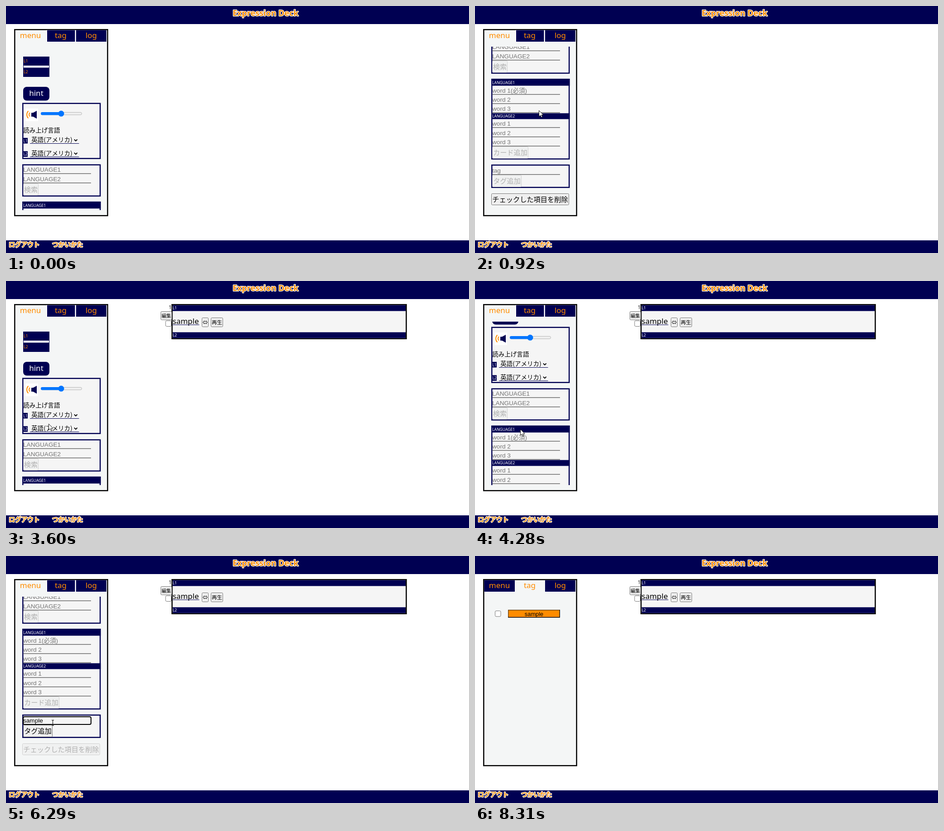
Write an HTML page with a canvas that moves like this. It is 1024x547 px and loops after 8.51 s.

```html
<!DOCTYPE html>
<html lang="ja">
<head>
<meta charset="utf-8">
<title>Expression Deck</title>
<style>
html, body { margin: 0; width: 100%; height: 100%; overflow: hidden; background: #fff; }
canvas { display: block; }
</style>
</head>
<body>
<canvas id="stage" width="1024" height="547"></canvas>
<script>
const ctx = document.getElementById('stage').getContext('2d');
const LOOP = 8510;
const NAVY = '#000052', ORANGE = '#ff8c00', PANEL = '#f4f6f6', BOX = '#f5f5f5';
const GREY = '#757575';
const UI = '"Noto Sans", "Noto Sans CJK JP", sans-serif';
const JP = '"Noto Sans CJK JP", "Noto Sans CJK", sans-serif';
const ARIAL = '"Liberation Sans", "Noto Sans CJK JP", sans-serif';

// Keyframes: [time, ...values]
const SCROLL = [[200, 0], [690, 242], [800, 272], [3599, 272], [3600, 0],
  [4140, 0], [4480, 272], [6999, 272], [7000, 0]];
const POINTER = [[200, 197, 296], [560, 141, 262], [800, 141, 262], [1050, 140, 197],
  [1180, 140, 197], [1520, 155, 190], [2660, 155, 190], [3270, 94, 307], [3400, 94, 314],
  [3600, 94, 316], [3740, 94, 316], [3870, 97, 310], [4140, 97, 310], [4560, 106, 365],
  [6220, 106, 365], [6560, 90, 383], [7200, 90, 383], [7860, 130, 69]];
const CARD_KEYS = [1920, 2050, 2200, 2330, 2530, 2600];
const TAG_KEYS = [5030, 5140, 5250, 5360, 5560, 5760];

function track(keys, t) {
  if (t <= keys[0][0]) return keys[0].slice(1);
  for (let i = 1; i < keys.length; i++) {
    const a = keys[i - 1], b = keys[i];
    if (t < b[0]) {
      const k = (t - a[0]) / (b[0] - a[0]);
      return a.slice(1).map((v, j) => v + (b[j + 1] - v) * k);
    }
  }
  return keys[keys.length - 1].slice(1);
}

const typed = (keys, t) => 'sample'.slice(0, keys.filter(k => t >= k).length);
const between = (t, a, b) => t >= a && t < b;

function rect(x, y, x2, y2, color) {
  ctx.fillStyle = color;
  ctx.fillRect(x, y, x2 - x, y2 - y);
}

function rounded(x, y, x2, y2, r, fill, stroke, width = 1) {
  ctx.beginPath();
  ctx.roundRect(x, y, x2 - x, y2 - y, r);
  if (fill) { ctx.fillStyle = fill; ctx.fill(); }
  if (stroke) { ctx.strokeStyle = stroke; ctx.lineWidth = width; ctx.stroke(); }
}

function text(s, x, y, size, color, family = UI, align = 'left') {
  ctx.font = `${size}px ${family}`;
  ctx.textAlign = align;
  ctx.fillStyle = color;
  ctx.fillText(s, x, y);
}

function outlined(s, x, y, size, align, family) {
  ctx.font = `bold ${size}px ${family}`;
  ctx.textAlign = align;
  ctx.lineJoin = 'round';
  ctx.lineWidth = 2.4;
  ctx.strokeStyle = '#fff';
  ctx.strokeText(s, x, y);
  ctx.fillStyle = ORANGE;
  ctx.fillText(s, x, y);
}

function frame(x, y, x2, y2, color, fill) {
  rect(x, y, x2, y2, color);
  rect(x + 2.5, y + 2.5, x2 - 2.5, y2 - 2.5, fill);
}

function button(s, x, y, x2, y2, size, on = true) {
  rounded(x + .5, y + .5, x2 - .5, y2 - .5, 2, on ? '#efefef' : '#f0f1f1', on ? '#767676' : '#d0d0d0');
  text(s, (x + x2) / 2, (y + y2) / 2 + size * .37, size, on ? '#000' : '#b0b0b0', JP, 'center');
}

function checkbox(x, y) {
  rounded(x + .5, y + .5, x + 13, y + 13, 2.5, '#fff', '#767676');
}

function field(hint, line, value = '', focus = false) {
  if (focus) rounded(38, line - 17, 188, line, 3, BOX, '#000', 2);
  else rect(38, line - .5, 188, line + 1, '#6b6b6b');
  text(value || hint, 38, line - 4, 13.6, value ? '#000' : GREY, ARIAL);
  if (focus && value.length < 2) rect(38 + value.length * 7, line - 15, 39 + value.length * 7, line - 2, '#000');
}

function chip(s, y) {
  rect(38, y, 48, y + 12.5, NAVY);
  text(s, 38.5, y + 9.5, 8, '#fff');
}

function language(name, y) {
  chip(name, y);
  text('英語(アメリカ)', 56, y + 9, 13.6, '#000', JP);
  rect(53, y + 12, 161.5, y + 13, NAVY);
  ctx.beginPath();
  ctx.moveTo(151, y + 3.5);
  ctx.lineTo(154.3, y + 6.8);
  ctx.lineTo(157.6, y + 3.5);
  ctx.strokeStyle = '#000';
  ctx.lineWidth = 1.8;
  ctx.stroke();
}

function speaker() {
  rect(43, 227, 71, 255, '#fff');
  ctx.strokeStyle = ORANGE;
  ctx.lineWidth = 2;
  for (const [x, r] of [[57, 11], [57, 6]]) {
    ctx.beginPath();
    ctx.arc(x, 240.5, r, Math.PI * .74, Math.PI * 1.26);
    ctx.stroke();
  }
  rect(56, 236.5, 61, 245, NAVY);
  ctx.beginPath();
  ctx.moveTo(59, 237);
  ctx.lineTo(68, 232);
  ctx.lineTo(68, 249.5);
  ctx.lineTo(59, 244.5);
  ctx.fill();
}

function slider() {
  rounded(77.5, 235.5, 167.5, 241, 2.7, '#efefef', '#b5b5b5');
  rounded(77, 235, 124, 241.5, 3, '#0075ff');
  ctx.beginPath();
  ctx.arc(122, 238.3, 6.5, 0, 7);
  ctx.fill();
}

function menu(t) {
  const cardWord = t < 3600 ? typed(CARD_KEYS, t) : '';
  const tagWord = t < 6700 ? typed(TAG_KEYS, t) : '';
  ctx.save();
  ctx.beginPath();
  ctx.rect(34, 90, 180, 362);
  ctx.clip();
  ctx.translate(0, -Math.round(track(SCROLL, t)[0]));

  rect(38, 112, 96, 157, NAVY);
  rect(39, 132, 95, 136.5, '#fff');
  text('L1', 39, 125, 8.6, ORANGE);
  text('L2', 39, 149, 8.6, ORANGE);
  rounded(38, 179, 96, 209.5, 8, NAVY);
  text('hint', 67, 199, 17, '#fff', UI, 'center');

  frame(36, 214.5, 209.5, 339, NAVY, BOX);
  speaker();
  slider();
  text('読み上げ言語', 38, 280, 13.6, '#000', JP);
  language('L1', 292);
  language('L2', 321.5);

  frame(36, 350.5, 209.5, 422, NAVY, BOX);
  field('LANGUAGE1', 371);
  field('LANGUAGE2', 391.5);
  button('検索', 38, 393, 72, 419.5, 15.2, false);

  frame(36, 433, 209.5, 612, NAVY, BOX);
  rect(36, 433, 209.5, 448.5, NAVY);
  text('LANGUAGE1', 38, 445, 8.6, '#fff');
  field('word 1(必須)', 467.5, cardWord, between(t, 1660, 3270));
  field('word 2', 488);
  field('word 3', 508);
  rect(36, 509.5, 209.5, 522.5, NAVY);
  text('LANGUAGE2', 38, 519, 8.6, '#fff');
  field('word 1', 541);
  field('word 2', 561.5);
  field('word 3', 582);
  button('カード追加', 38, 583, 118, 610, 15.2, !!cardWord);

  frame(36, 623, 209.5, 675, NAVY, BOX);
  field('tag', 645, tagWord, between(t, 4620, 6700));
  button('タグ追加', 38, 646, 103, 673, 15.2, !!tagWord);
  button('チェックした項目を削除', 36, 687, 208, 713, 15.25, t < 3600);
  ctx.restore();
}

function tags() {
  checkbox(44, 121);
  rect(73, 119, 188, 136.5, '#000');
  rect(73, 119, 187, 135, '#6e4a1c');
  rect(74.5, 120.5, 186.5, 135, ORANGE);
  text('sample', 130.5, 132.5, 12.8, '#000', ARIAL, 'center');
}

function panel(t) {
  const onTag = t >= 7920;
  frame(18, 51, 226, 465.5, '#000', PANEL);
  if (onTag) {
    rect(20.5, 53.5, 88, 79, NAVY);
  } else {
    rect(89.5, 53.5, 155, 79, '#fff');
    rect(91, 53.5, 152.5, 79, NAVY);
  }
  rect(155, 53.5, 222, 79, NAVY);
  text('menu', 54, 71, 17, ORANGE, UI, 'center');
  text('tag', 121, 71, 17, ORANGE, UI, 'center');
  text('log', 188.5, 71, 17, ORANGE, UI, 'center');
  onTag ? tags() : menu(t);
}

function card() {
  frame(366, 51, 886.5, 129, '#000', BOX);
  rect(368.5, 53.5, 884, 66.5, NAVY);
  rect(368.5, 113.5, 884, 126.5, NAVY);
  text('L1', 368.5, 62.5, 8.6, '#fff');
  text('L2', 368.5, 122.5, 8.6, '#fff');
  text('sample', 368.5, 95, 17, '#000');
  rect(368.5, 96.5, 427.5, 97.5, NAVY);
  button('⇔', 433, 81, 448, 102, 11.5);
  button('再生', 453, 81, 480, 102, 11.5);
  text('1', 366, 62, 10.5, '#000', UI, 'right');
  button('編集', 342, 67, 367, 86.5, 10.5);
  checkbox(352.5, 87.5);
}

function pointer(t) {
  if (!between(t, 200, 8310)) return;
  const [x, y] = track(POINTER, t).map(Math.round);
  if (between(t, 1350, 2720) || between(t, 4500, 6350)) {
    rect(x, y - 5, x + 1, y + 6, '#000');
    rect(x - 2, y - 6, x + 3, y - 5, '#000');
    rect(x - 2, y + 6, x + 3, y + 7, '#000');
    return;
  }
  const shape = new Path2D(`M${x + .5} ${y + .5}v13.5l3.2-3 2.1 5 2.2-1-2.1-4.8h4.3z`);
  ctx.fillStyle = '#fff';
  ctx.fill(shape);
  ctx.strokeStyle = '#000';
  ctx.lineWidth = .9;
  ctx.stroke(shape);
}

function draw(t) {
  rect(0, 0, 1024, 547, '#fff');
  rect(0, 0, 1024, 40, NAVY);
  rect(0, 519, 1024, 547, NAVY);
  outlined('Expression Deck', 574, 22, 18, 'center', UI);
  outlined('ログアウト', 6, 533, 13.7, 'left', JP);
  outlined('つかいかた', 102, 533, 13.7, 'left', JP);
  panel(t);
  if (t >= 3600) card();
  pointer(t);
}

const start = performance.now();
function tick() {
  draw((performance.now() - start) % LOOP);
  requestAnimationFrame(tick);
}
tick();
</script>
</body>
</html>
```
